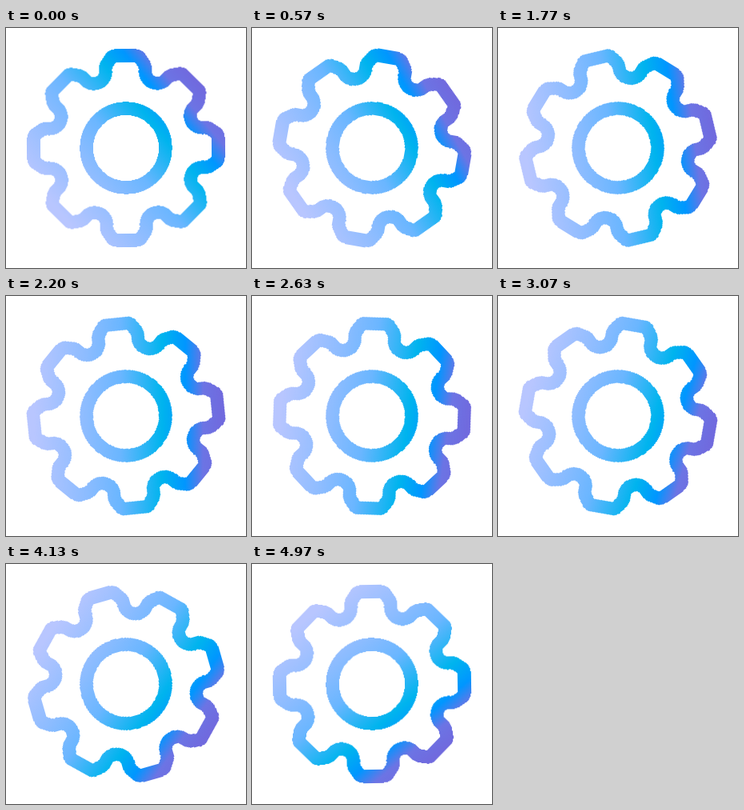
Animation, 300 px wide and 300 px high, one loop 5 s. Source, as an HTML page:

```html
<!DOCTYPE html>
<html lang="en">
<head>
<meta charset="utf-8">
<title>Turning gear</title>
<style>
  html, body { margin: 0; width: 100%; height: 100%; overflow: hidden; background: #fff; }
  svg { display: block; width: 100vw; height: 100vh; }
  #gear {
    fill: none;
    stroke: url(#tint);
    stroke-width: 16.5;
    stroke-linejoin: round;
    shape-rendering: crispEdges;
    transform-origin: 0 0;
    animation: turn 5s linear infinite;
  }
  @keyframes turn {
    from { transform: rotate(-0.4deg); }
    to { transform: rotate(89.6deg); }
  }
</style>
</head>
<body>
<svg viewBox="-150 -150 300 300">
  <defs>
    <linearGradient id="tint" gradientUnits="userSpaceOnUse" x1="-89.4" y1="72.4" x2="93.2" y2="-75.5">
      <stop offset="0" stop-color="#b8c6ff"/>
      <stop offset=".28" stop-color="#8cbcff"/>
      <stop offset=".46" stop-color="#6ab6ff"/>
      <stop offset=".68" stop-color="#00b4ee"/>
      <stop offset=".805" stop-color="#0096ff"/>
      <stop offset=".9" stop-color="#6c74e4"/>
      <stop offset="1" stop-color="#706ade"/>
    </linearGradient>
  </defs>
  <g id="gear">
    <path id="rim"/>
    <circle r="49.4"/>
  </g>
</svg>
<script>
  const TEETH = 8;
  const VALLEY = "A14.9 14.9 0 0 0 ";

  // Point of the upright tooth, turned to tooth number i
  function at(i, x, y) {
    const a = i * 2 * Math.PI / TEETH, c = Math.cos(a), s = Math.sin(a);
    return `${(x * c - y * s).toFixed(2)} ${(x * s + y * c).toFixed(2)}`;
  }

  let d = "";
  for (let i = 0; i < TEETH; i++) {
    const left = (x, y) => at(i, -x, y), right = (x, y) => at(i, x, y);
    d += (i ? VALLEY : "M") + left(24.8, -97.5)
       + `Q${left(25.4, -102.5)} ${left(21.5, -107.5)}L${left(18, -112.5)}`
       + `Q${left(16, -115.3)} ${left(13, -115.3)}`
       + `L${right(13, -115.3)}Q${right(16, -115.3)} ${right(18, -112.5)}`
       + `L${right(21.5, -107.5)}Q${right(25.4, -102.5)} ${right(24.8, -97.5)}`;
  }
  d += VALLEY + at(0, -24.8, -97.5) + "Z";
  document.getElementById("rim").setAttribute("d", d);
</script>
</body>
</html>
```
